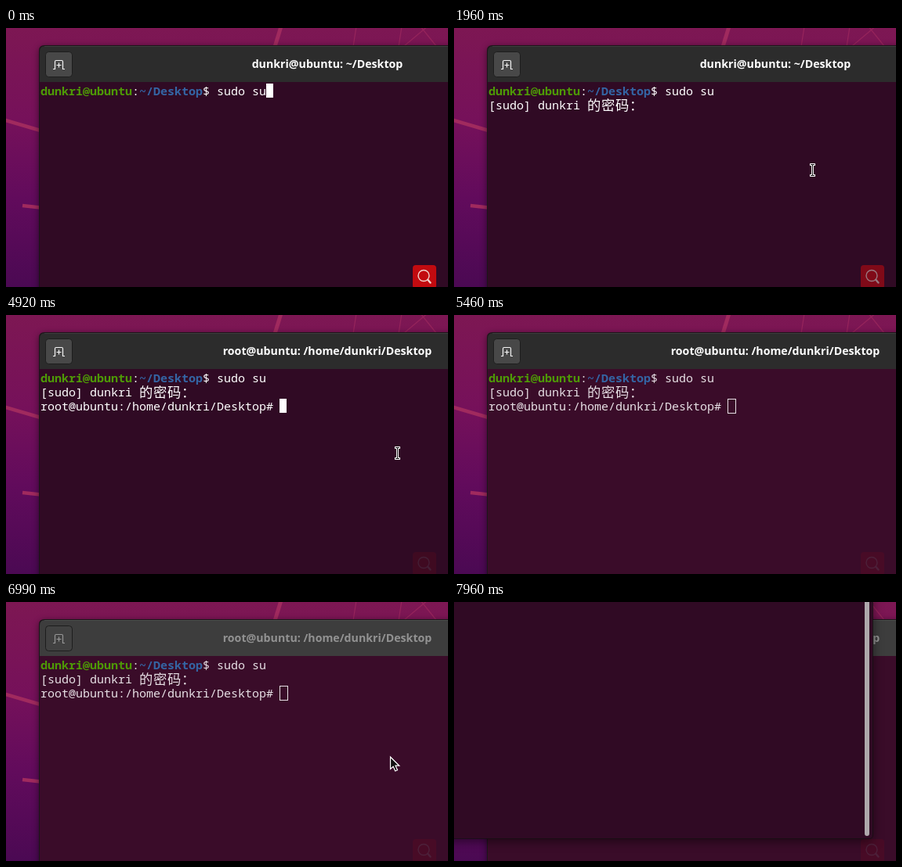
These frames come from a looping animation (564x331 px, 8000 ms). An HTML page:

```html
<!DOCTYPE html>
<html lang="zh">
<head>
<meta charset="utf-8">
<title>Terminal</title>
<style>
  html, body { margin: 0; width: 100%; height: 100%; overflow: hidden; background: #300a24; }
  #stage { position: absolute; left: 0; top: 0; width: 564px; height: 331px; overflow: hidden; }
  svg { position: absolute; left: 0; top: 0; display: block; }
  text { white-space: pre; }
  .mono { font: 15px "Noto Sans Mono", "DejaVu Sans Mono", monospace; }
  .bold { font-weight: 700; }
  .cjk { font: 17.3px "Noto Sans CJK SC", "Noto Sans CJK", sans-serif; letter-spacing: .7px; }
  #title { font: 700 14.2px "Open Sans", "Noto Sans", sans-serif; text-anchor: middle; }
  .clip { position: absolute; left: 0; width: 564px; overflow: hidden; }
  .pane { position: absolute; left: -60px; background: #300a24; border-radius: 0 0 4px 0;
    box-shadow: 0 0 0 1px rgba(20, 16, 18, .75), 0 3px 14px rgba(0, 0, 0, .55); }
  .pane::after { content: ""; position: absolute; right: 4px; bottom: 3px; top: 0; width: 6px;
    border-radius: 3px; background: #aea8ac; }
</style>
</head>
<body>
<div id="stage">
  <svg width="564" height="331" viewBox="0 0 564 331">
    <defs>
      <linearGradient id="wall" x1="0" y1="0" x2="0" y2="1">
        <stop offset="0" stop-color="#7d1753"/>
        <stop offset=".35" stop-color="#76115a"/>
        <stop offset=".65" stop-color="#620b5c"/>
        <stop offset="1" stop-color="#4b0953"/>
      </linearGradient>
      <filter id="blur" x="-10%" y="-10%" width="120%" height="120%">
        <feGaussianBlur stdDeviation="4"/>
      </filter>
    </defs>

    <rect width="564" height="331" fill="url(#wall)"/>
    <g fill="none" stroke="#a02a5e">
      <path d="M-2 117.5L44 131" stroke-width="4.5"/>
      <path d="M21 227L44 229.5" stroke-width="4.5"/>
      <path d="M351 -2L343 24" stroke-width="5"/>
      <path d="M447 -2L443 24M505 -2L501 24M508 23L539 -3M528 -3L549 23" stroke-width="1.3" opacity=".7"/>
    </g>

    <rect x="42" y="24" width="560" height="340" rx="7" opacity=".5" filter="url(#blur)"/>
    <path d="M42 340V29q0-7 7-7H570V340z" fill="#1c1519"/>
    <path id="bar" d="M43 69V30q0-7 7-7H564V69z"/>
    <path d="M49 23.5H564" stroke="#fff" opacity=".08"/>
    <rect id="body" x="43" y="69" width="521" height="262"/>

    <rect id="btn" x="50.5" y="30.5" width="34" height="32" rx="4" stroke="#1d1d1d"/>
    <path id="tab" d="M60 52.5H62.5V43q0-1.5 1.5-1.5H71q1.5 0 1.5 1.5V52.5H75M67.5 44.5V50.5M64.5 47.5H70.5" fill="none" stroke-width="1.2"/>
    <text id="title" x="410" y="51"></text>

    <g class="mono" id="lines">
      <text x="44" y="86"><tspan class="bold" fill="#4e9a06">dunkri@ubuntu</tspan>:<tspan class="bold" fill="#3465a4">~/Desktop</tspan>$ sudo su</text>
      <g id="ask">
        <text x="44" y="104">[sudo] dunkri </text>
        <text class="cjk" x="170" y="104.5">的密码：</text>
      </g>
      <text id="root" x="44" y="122">root@ubuntu:/home/dunkri/Desktop# </text>
    </g>
    <rect id="block" width="9" height="18" fill="#fff"/>
    <rect id="hollow" x="349.5" y="107.5" width="10" height="18" fill="none" stroke="#e6dfe4"/>

    <g id="lens">
      <rect x="519" y="303" width="30" height="30" rx="4" fill="#c20b10"/>
      <g fill="none" stroke="#f0d2cb" stroke-width="1.4" stroke-linecap="round">
        <circle cx="533" cy="316.5" r="7"/>
        <path d="M538.5 322L541.5 325.5" stroke-width="2.4"/>
      </g>
    </g>
  </svg>

  <div class="clip" style="top:0;height:138px"><div class="pane" id="upper"></div></div>
  <div class="clip" style="top:138px;height:193px"><div class="pane" id="lower"></div></div>

  <svg width="564" height="331" viewBox="0 0 564 331">
    <g id="beam" fill="none">
      <path d="M-3.5 -7H3.5M0 -7V7M-3.5 7H3.5" stroke="#fff" stroke-width="3"/>
      <path d="M-2.5 -7H2.5M0 -7V7M-2.5 7H2.5" stroke="#111" stroke-width="1"/>
    </g>
    <path id="arrow" d="M0 0V15.5L3.6 12.2L6.2 18L9 16.8L6.5 11.2H11.3z" fill="#111" stroke="#fff" stroke-width="1.2"/>
  </svg>
</div>

<script>
const LOOP = 8000;
const el = Object.fromEntries([...document.querySelectorAll("[id]")].map(e => [e.id, e]));

// Each row: start time, then values that hold until the next row.
const caret = [[0, 332, 71], [200], [820, 332, 71], [1280, 251, 89], [1820], [2490, 251, 89],
  [4500, 349, 107], [5130]];
const pointer = [[0], [470, "beam", 451.5, 184.5], [820, "beam", 457.5, 181.5], [3090],
  [4920, "beam", 499.5, 176.5], [5060], [5530, "arrow", 490.5, 198],
  [7060, "beam", 459.5, 178], [7960]];
const panes = [[0], [7060, 485, 477, 280, .97], [7130, 485, 485, 281, 1], [7960, 534, 534, 302, 1]];
const fades = [200, 600, 950, 1280, 1550, 1890, 2220, 2490, 2820, 3160, 3440, 3770];
const blurred = [[0, 0], [5530, .4], [5600, .75], [5670, 1]];

const at = (rows, t) => rows.filter(r => r[0] <= t).pop().slice(1);
const show = (e, on) => { e.style.display = on ? "" : "none"; };
const grey = (a, b, k) => { const v = Math.round(a + (b - a) * k); return `rgb(${v},${v},${v})`; };
const move = (e, x, y) => e.setAttribute("transform", `translate(${x} ${y})`);

function size(e, right, bottom, alpha) {
  e.style.top = "-60px";
  e.style.width = right + 60 + "px";
  e.style.height = bottom + 60 + "px";
  e.style.opacity = alpha;
}

function draw(t) {
  const isRoot = t >= 4500, away = t >= 5460;
  const [k] = at(blurred, t);
  el.bar.style.fill = grey(44, 61, k);
  el.btn.style.fill = grey(72, 65, k);
  el.tab.style.stroke = grey(245, 150, k);
  el.title.style.fill = grey(255, 146, k);
  el.title.textContent = isRoot ? "root@ubuntu: /home/dunkri/Desktop" : "dunkri@ubuntu: ~/Desktop";
  el.body.style.fill = away ? "#3a0c29" : "#300a24";
  el.lines.style.fill = away ? "#e6dfe4" : "#fff";
  show(el.ask, t >= 1280);
  show(el.root, isRoot);

  const [cx, cy] = at(caret, t);
  show(el.block, cx);
  if (cx) move(el.block, cx, cy);
  show(el.hollow, away);
  el.lens.style.opacity = 1 - .075 * fades.filter(f => f <= t).length;

  const [top, low, bottom, alpha] = at(panes, t);
  show(el.upper, top);
  show(el.lower, top);
  if (top) {
    size(el.upper, top, bottom, alpha);
    size(el.lower, low, bottom - 138, alpha);
  }

  const [kind, px, py] = at(pointer, t);
  for (const name of ["beam", "arrow"]) {
    show(el[name], kind === name);
    if (kind === name) move(el[name], px, py);
  }
}

const start = performance.now();
function tick() {
  draw((performance.now() - start) % LOOP);
  requestAnimationFrame(tick);
}
tick();
</script>
</body>
</html>
```
